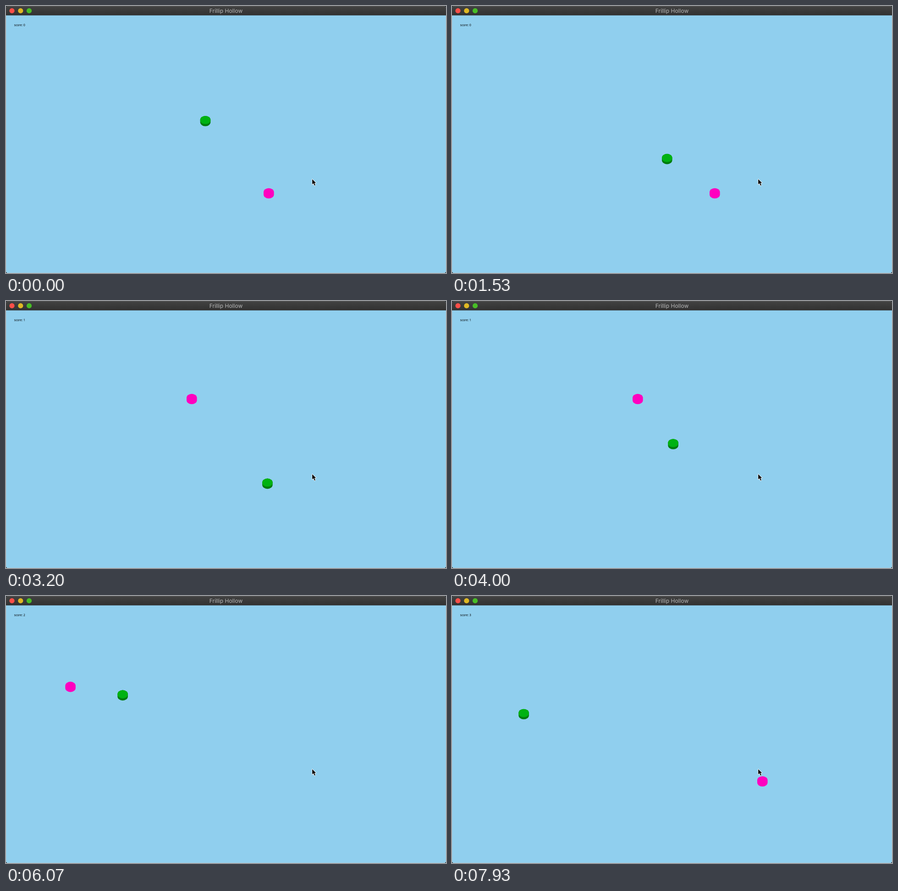
Recreate the animation shown at these times as an HTML page. Size 960 by 583 pixels, loop 8 s.

```html
<!DOCTYPE html>
<html lang="en">
<head>
<meta charset="utf-8">
<title>Frillip Hollow</title>
<style>
  html, body { margin: 0; width: 100%; height: 100%; overflow: hidden; background: #000; }
  svg { display: block; width: 100vw; height: 100vh; }
  .title { font: 12px Inter, sans-serif; fill: #b8b8b8; text-anchor: middle; }
  .score { font: 6.6px "Noto Sans", sans-serif; fill: #000; }
</style>
</head>
<body>
<svg viewBox="0 0 960 583">
  <defs>
    <linearGradient id="bar" x2="0" y2="1">
      <stop offset="0" stop-color="#434343"/>
      <stop offset="1" stop-color="#313131"/>
    </linearGradient>
    <path id="side" d="M-11.3 -2.4A11.3 8.9 0 0 1 11.3 -2.4V2.4A11.3 8.9 0 0 1 -11.3 2.4Z"/>
  </defs>

  <rect width="960" height="583" rx="4" fill="#90cfee"/>
  <path d="M.5 21V579Q.5 582.5 4 582.5H956Q959.5 582.5 959.5 579V21" fill="none" stroke="#a6cfe2"/>
  <path d="M0 20.5V4Q0 0 4 0H956Q960 0 960 4V20.5Z" fill="url(#bar)"/>
  <path d="M4 .5H956" stroke="#555"/>
  <circle cx="13" cy="10.4" r="5.6" fill="#fc4f48"/>
  <circle cx="31.8" cy="10.4" r="5.6" fill="#dfb824"/>
  <circle cx="50.5" cy="10.4" r="5.6" fill="#48bd26"/>
  <text class="title" x="480" y="15">Frillip Hollow</text>
  <text class="score" id="score" x="17.8" y="43.5">score: 0</text>

  <use id="goal" href="#side" fill="#ff00bf"/>
  <g id="player">
    <use href="#side" fill="#007d0d"/>
    <ellipse cy="-2.4" rx="11.3" ry="8.9" fill="#00b212"/>
  </g>
  <path d="M668.2 378.2V389.6L670.9 387.1L673.1 392.1L675 391.3L672.8 386.4H676.4Z"
        stroke="#fff" stroke-width="1.6" stroke-linejoin="round" paint-order="stroke"/>
</svg>
<script>
  const LOOP = 8000, STEP = 1000 / 15, LAST = 119;
  const DRAG = 3;  // steps for the speed to settle

  // Key holds per axis: pressed at a step, released at a step, distance gained
  const home = { x: 435, y: 251.3 };
  const holds = {
    x: [[17.4, 32.2, 165.3], [41.9, 52, -85.9], [52, 66.5, -93.4], [72.3, 101.8, -312.5], [110, 125, 117]],
    y: [[8.1, 31.7, 164], [42.9, 52, -56.3], [52, 67.1, -138.2], [68, 104, -7], [110.5, 125, 113]]
  };
  const goals = [
    { from: 0, x: 573.3, y: 409 },
    { from: 31, x: 405.3, y: 214 },
    { from: 71, x: 140.6, y: 198.4 },
    { from: 100, x: 677.3, y: 404.7 }
  ];

  const byId = id => document.getElementById(id);
  const player = byId("player"), goal = byId("goal"), score = byId("score");

  // Distance covered at unit thrust against drag, starting from rest
  const glide = t => t > 0 ? t - DRAG * (1 - Math.exp(-t / DRAG)) : 0;

  const position = (axis, n) => holds[axis].reduce(
    (sum, [press, release, distance]) =>
      sum + distance * (glide(n - press) - glide(n - release)) / (release - press),
    home[axis]);

  function place(el, x, y) {
    el.setAttribute("transform", `translate(${x.toFixed(2)} ${y.toFixed(2)})`);
  }

  function draw(time) {
    const n = Math.min(LAST, Math.floor((time % LOOP) / STEP + 0.1));
    const points = goals.filter(g => g.from <= n).length - 1;
    place(player, position("x", n), position("y", n));
    place(goal, goals[points].x, goals[points].y);
    score.textContent = `score: ${points}`;
  }

  const start = performance.now();
  function tick() {
    draw(performance.now() - start);
    requestAnimationFrame(tick);
  }
  tick();
</script>
</body>
</html>
```
